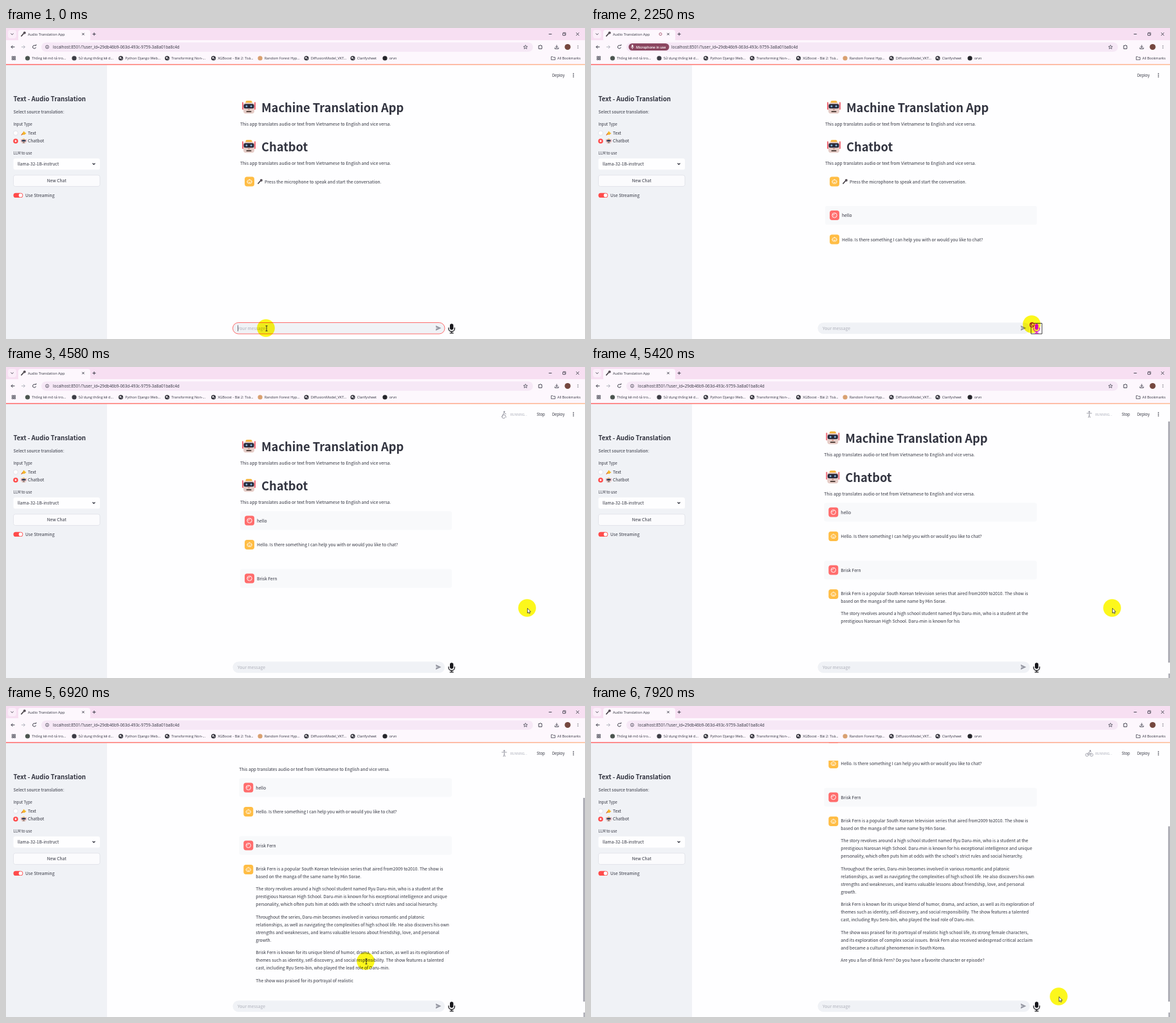
These frames come from a looping animation (900x484 px, 8000 ms). An HTML page with a canvas:

```html
<!DOCTYPE html>
<html lang="en">
<head>
<meta charset="utf-8">
<title>Audio Translation App</title>
<style>
html, body { margin: 0; width: 100%; height: 100%; overflow: hidden; background: #fefeff; }
canvas { display: block; width: 900px; height: 484px; }
</style>
</head>
<body>
<canvas id="stage"></canvas>
<script>
const LOOP = 8000;
const canvas = document.getElementById('stage');
const ctx = canvas.getContext('2d');
const ratio = window.devicePixelRatio || 1;
canvas.width = 900 * ratio;
canvas.height = 484 * ratio;

const APP = '"Noto Sans CJK SC", "Noto Sans CJK JP", "Noto Sans CJK", sans-serif';
const CHROME = '"Open Sans", "Noto Sans", sans-serif';
const BODY = 6.72, LABEL = 5.88;
const INK = '#31333f', PAGE = '#fefeff', PANEL = '#f0f2f6', BUBBLE = '#f8f9fb';
const RED = '#ff4b4b', GRAY = '#92949f', FAINT = '#aeb0ba';
const STRIP = '#f7dff2', TOOLBAR = '#fdf7fd', FIELD = '#f6e8f6';

const GREETING = 'Hello. Is there something I can help you with or would you like to chat?';
const SHOW = 'Brisk Fern';
const PARAGRAPHS = [
  [`${SHOW} is a popular South Korean television series that aired from2009 to2010. The show is`,
   'based on the manga of the same name by Min Sorae.'],
  ['The story revolves around a high school student named Ryu Daru-min, who is a student at the',
   'prestigious Narosan High School. Daru-min is known for his exceptional intelligence and unique',
   "personality, which often puts him at odds with the school's strict rules and social hierarchy."],
  ['Throughout the series, Daru-min becomes involved in various romantic and platonic',
   'relationships, as well as navigating the complexities of high school life. He also discovers his own',
   'strengths and weaknesses, and learns valuable lessons about friendship, love, and personal',
   'growth.'],
  [`${SHOW} is known for its unique blend of humor, drama, and action, as well as its exploration of`,
   'themes such as identity, self-discovery, and social responsibility. The show features a talented',
   'cast, including Ryu Sero-bin, who played the lead role of Daru-min.'],
  ['The show was praised for its portrayal of realistic high school life, its strong female characters,',
   `and its exploration of complex social issues. ${SHOW} also received widespread critical acclaim`,
   'and became a cultural phenomenon in South Korea.'],
  [`Are you a fan of ${SHOW}? Do you have a favorite character or episode?`]
];

// Flatten the answer into lines with their page position and first character.
const lines = [];
let nextY = 365, nextStart = 0;
for (const paragraph of PARAGRAPHS) {
  for (const words of paragraph) {
    lines.push({ words, y: nextY, start: nextStart });
    nextStart += words.length + 1;
    nextY += 12;
  }
  nextY += 7.5;
}
const answer = lines.map(line => line.words).join(' ');
const after = phrase => answer.indexOf(phrase) + phrase.length + 3;

const STREAM = [[4680, 0], [5420, after('known for his')], [6920, after('of realistic')], [7450, answer.length]];
const POINTER = [[0, 404, 467], [1250, 404, 467], [1850, 685, 461], [3350, 685, 461], [4000, 810, 375],
  [5950, 810, 375], [6600, 559, 397], [7100, 559, 397], [7800, 727, 452]];

const within = (t, from, to) => t >= from && t < to;
const clamp = v => Math.min(1, Math.max(0, v));
const smooth = v => v * v * (3 - 2 * v);

function track(keys, t, ease = v => v) {
  if (t <= keys[0][0]) return keys[0].slice(1);
  for (let i = 1; i < keys.length; i++) {
    const a = keys[i - 1], b = keys[i];
    if (t <= b[0]) {
      const k = ease((t - a[0]) / (b[0] - a[0]));
      return a.slice(1).map((v, j) => v + (b[j + 1] - v) * k);
    }
  }
  return keys[keys.length - 1].slice(1);
}

// Number of characters shown, cut at a whole word.
function wordCut(text, n) {
  n = Math.round(n);
  return n >= text.length ? text.length : Math.max(0, text.lastIndexOf(' ', n));
}
const streamed = t => wordCut(answer, track(STREAM, t)[0]);

function scrollAt(t) {
  const shown = streamed(t - Math.max(0, 60 + (t - 5420) / 6));
  const last = lines.filter(line => line.start < shown).pop();
  return last ? Math.max(0, last.y - 395.5) : 0;
}

// Drawing helpers; text is placed by the middle of its capitals.
function text(words, x, y, size = BODY, { color = INK, weight = 400, font = APP, align = 'left' } = {}) {
  ctx.font = `${weight} ${size}px ${font}`;
  ctx.textAlign = align;
  ctx.fillStyle = color;
  ctx.fillText(words, x, y + size * 0.367);
}
const chromeText = (words, x, y, size = 5.5) => text(words, x, y, size, { font: CHROME });

function box(x, y, w, h, fill, radius = 0, stroke) {
  ctx.beginPath();
  ctx.roundRect(x, y, w, h, radius);
  if (fill) { ctx.fillStyle = fill; ctx.fill(); }
  if (stroke) { ctx.strokeStyle = stroke; ctx.lineWidth = 0.8; ctx.stroke(); }
}
function disc(x, y, r, fill) {
  ctx.beginPath();
  ctx.arc(x, y, r, 0, 7);
  ctx.fillStyle = fill;
  ctx.fill();
}
function ring(x, y, r, color, width = 0.8, from = 0, to = Math.PI * 2) {
  ctx.beginPath();
  ctx.arc(x, y, r, from, to);
  ctx.strokeStyle = color;
  ctx.lineWidth = width;
  ctx.stroke();
}
function path(d, x, y, { stroke, fill, width = 0.9 }) {
  ctx.save();
  ctx.translate(x, y);
  const shape = new Path2D(d);
  if (fill) { ctx.fillStyle = fill; ctx.fill(shape); }
  if (stroke) { ctx.strokeStyle = stroke; ctx.lineWidth = width; ctx.stroke(shape); }
  ctx.restore();
}

function robot(x, y, scale) {
  ctx.save();
  ctx.translate(x, y);
  ctx.scale(scale, scale);
  box(-10.5, -8, 2, 12, '#ef6a78', 1);
  box(8.5, -8, 2, 12, '#ef6a78', 1);
  box(-5, -10, 10, 4, '#f5b53c', 2);
  box(-8.5, -7, 17, 17, '#e6cdc8', 4);
  box(-8, -5, 16, 7, '#28283a', 2.5);
  disc(-3.6, -1.5, 1.5, '#7fb4d8');
  disc(3.6, -1.5, 1.5, '#7fb4d8');
  box(-1.5, 3, 3, 1.5, '#c98a78', 0.7);
  box(-4, 6, 8, 1.8, '#45332d', 0.9);
  ctx.restore();
}
function micEmoji(x, y) {
  path('M-3.5 3.5L0.5-1', x, y, { stroke: '#403a40', width: 1.6 });
  disc(x + 1.8, y - 2, 2, '#585058');
}
function microphone(recording) {
  const x = 692.7, y = 467.3, color = recording ? '#d400b8' : '#18181c';
  box(x - 2.7, y - 7, 5.4, 9.5, color, 2.7);
  path('M-4.7-1V0.5A4.7 4.7 0 0 0 4.7 0.5V-1M0 5V7.5M-3 7.5H3', x, y, { stroke: color, width: 1.3 });
}

function browser(recording) {
  box(0, 0, 900, 19, STRIP);
  box(3, 3, 13, 13, '#fbeef9', 4);
  path('M-2-1L0 1L2-1', 9.5, 9.5, { stroke: INK });
  box(19, 3, 112, 18, TOOLBAR, 4);
  micEmoji(27, 9.5);
  chromeText('Audio Translation App', 34, 9.7, 5.6);
  if (recording) ring(108, 9.5, 2, '#9b4560');
  path('M-1.7-1.7L1.7 1.7M1.7-1.7L-1.7 1.7', 120, 9.5, { stroke: INK });
  path('M-2.5 0H2.5M0-2.5V2.5', 137, 9.5, { stroke: INK });
  path('M-2.3 0H2.3', 846, 9.5, { stroke: INK });
  box(865.5, 8, 3.6, 3.6, null, 0.5, INK);
  path('M-1-1.5V-2.5H3V1.5H2', 867, 9.7, { stroke: INK, width: 0.6 });
  path('M-2.2-2.2L2.2 2.2M2.2-2.2L-2.2 2.2', 888.5, 9.5, { stroke: INK });

  box(0, 19, 900, 38, TOOLBAR);
  box(55, 22.5, 764, 14.5, FIELD, 7.2);
  path('M3 0H-2.5M0-2.5L-2.5 0L0 2.5', 10.5, 29.5, { stroke: INK });
  path('M-3 0H2.5M0-2.5L2.5 0L0 2.5', 27, 29.5, { stroke: FAINT });
  ring(44, 29.5, 2.5, INK, 0.9, 0.2, 5.3);
  path('M0.8-2.3H2.8V-4', 44, 29.5, { stroke: INK });
  if (recording) {
    box(58.5, 24, 63, 11, '#8b4660', 5.5);
    box(63.3, 26, 2.2, 4, '#fff', 1);
    path('M-2-1A2 2 0 0 0 2-1M0 1V3', 64.4, 30, { stroke: '#fff', width: 0.6 });
    text('Microphone in use', 70, 29.7, 5.2, { color: '#fff', weight: 600, font: CHROME });
  } else {
    ring(64, 29.5, 2.5, INK, 0.7);
    path('M0-0.4V1.5M0-1.6V-1', 64, 29.5, { stroke: INK, width: 0.7 });
  }
  chromeText('localhost:8501/?user_id=29db46b9-063d-493c-9759-3a8a01ba8c4d', recording ? 125 : 73, 29.7, 6.33);
  path('M0-3L0.9-1L3-0.8L1.4 0.6L1.9 2.8L0 1.6L-1.9 2.8L-1.4 0.6L-3-0.8L-0.9-1Z', 807.5, 29.6, { stroke: INK, width: 0.7 });
  path('M-2.5-1.8H-0.8A0.9 0.9 0 0 1 1-1.8H2.4V0A0.9 0.9 0 0 1 2.4 1.5V3H-2.5Z', 830.5, 29.3, { stroke: INK });
  path('M0-3V1M-1.8-0.8L0 1L1.8-0.8M-2.8 1V2.8H2.8V1', 856, 29.5, { stroke: INK });
  disc(873, 29.5, 4.6, '#75473f');
  for (const dy of [-2, 0, 2]) disc(889, 29.5 + dy, 0.6, INK);

  for (let i = 0; i < 4; i++) box(9.3 + (i % 2) * 3.2, 44.2 + (i >> 1) * 3.2, 2.1, 2.1, null, 0, INK);
  const bookmarks = [
    [33.5, 'Thống kê mô tả tro...', '#4c5550'], [106, 'Sử dụng thống kê d...', '#3c3c44'],
    [178.5, 'Python Django Web...'], [250.5, 'Transforming Non-...'],
    [322.5, 'XGBoost - Bài 2: Toà...'], [395, 'Random Forest Hyp...', '#d9a070'],
    [467, 'DiffusionModel_VKT...'], [539, 'Clarifysheet'], [589, 'orvn', '#25252a']
  ];
  for (const [x, label, mark] of bookmarks) {
    disc(x, 47, 3.6, mark || '#34343c');
    if (!mark) path('M-2.5-1L0-2L1 0L-1 1ZM1 1L2.5 0L1.5 2.5Z', x, 47, { fill: '#f4eef4' });
    chromeText(label, x + 6.7, 47);
  }
  path('M-3-2.3H-0.6L0.3-1.4H3V2.4H-3Z', 850.5, 47, { stroke: INK, width: 0.7 });
  chromeText('All Bookmarks', 857, 47, 5.4);

  const decoration = ctx.createLinearGradient(0, 0, 900, 0);
  decoration.addColorStop(0, RED);
  decoration.addColorStop(1, '#ffae80');
  box(0, 56.2, 900, 1.3, decoration);
}

function sidebar() {
  box(0, 57.5, 157, 427, PANEL);
  text('Text - Audio Translation', 11.5, 110.5, 9.75, { weight: 600 });
  text('Select source translation:', 11.5, 130.7);
  text('Input Type', 11.5, 150, LABEL);
  disc(15, 163.5, 3.6, PAGE);
  ring(15, 163.5, 3.6, '#d3d5de', 0.6);
  path('M-3.5 2.5L0-3L2-1L4 0.5L1 2.7Z', 27.5, 163.5, { fill: '#f4b62c' });
  path('M-3.7 3.3L-1.5 0.5', 27.5, 163.5, { stroke: '#d7663a', width: 1.2 });
  text('Text', 34, 163.7);
  disc(15, 176, 3.8, RED);
  disc(15, 176, 1.4, '#fff');
  robot(27.5, 176, 0.38);
  text('Chatbot', 34, 176);
  text('LLM to use', 11.5, 194.5, LABEL);
  box(11.5, 203, 134.5, 17.5, PAGE, 3);
  text('llama-32-1B-instruct', 18, 211.8);
  path('M-2-1L0 1L2-1', 136.5, 211.5, { stroke: INK, width: 1.2 });
  box(11.5, 229, 134.5, 17.5, '#fbfbfd', 3, '#dfe0e8');
  text('New Chat', 78.7, 237.8, BODY, { align: 'center' });
  box(11.5, 256.7, 14.8, 7.4, RED, 3.7);
  disc(22.6, 260.4, 2.8, '#fff');
  text('Use Streaming', 30, 260.6);
}

function avatar(x, y, human) {
  box(x + 7, y - 7.5, 15, 15, human ? '#ff6c6c' : '#ffbd45', 3.7);
  const cx = x + 14.5;
  if (human) {
    ring(cx, y, 3.7, '#fff', 0.9);
    path('M-3.4-0.8Q0 0 1-3M-1.3 0.9V1.5M1.5 0.9V1.5', cx, y, { stroke: '#fff', width: 0.8 });
  } else {
    box(cx - 3.2, y - 2.5, 6.4, 5.5, null, 2, '#fff');
    path('M0-4V-2.5M-4.3 0.3H-3.2M3.2 0.3H4.3M-1.3-0.5V0.3M1.3-0.5V0.3M-1.5 1.6H1.5', cx, y, { stroke: '#fff', width: 0.8 });
  }
}
function message(x, y, words, human) {
  if (human) box(x, y - 14.5, 693 - x, 29, BUBBLE, 3);
  avatar(x, y, human);
  text(words, x + 26, y + 0.2);
}

function conversation(t, x, scroll) {
  const intro = 'This app translates audio or text from Vietnamese to English and vice versa.';
  ctx.save();
  ctx.translate(0, -scroll);
  [['Machine Translation App', 124], ['Chatbot', 185]].forEach(([title, y]) => {
    robot(x + 13.5, y - 0.7, 1);
    text(title, x + 33, y, 18.3, { weight: 700 });
    text(intro, x, y + 25.7);
  });

  const reply = GREETING.slice(0, wordCut(GREETING, GREETING.length * clamp((t - 950) / 400)));
  if (t < 4250) {
    avatar(x, 239, false);
    micEmoji(x + 31, 239);
    text('Press the microphone to speak and start the conversation.', x + 38, 239.2);
    if (t >= 640) message(x, 291.5, 'hello', true);
    if (reply) message(x, 329, reply, false);
  } else {
    message(x, 239, 'hello', true);
    message(x, 276.5, GREETING, false);
    message(x, 329, SHOW, true);
    const shown = streamed(t);
    if (shown) avatar(x, 366.5, false);
    for (const line of lines) {
      if (line.start < shown) text(line.words.slice(0, shown - line.start), x + 26, line.y + 0.2);
    }
  }
  ctx.restore();
}

function header(t) {
  box(157, 57.5, 743, 27.5, PAGE);
  text('Deploy', 849, 73.8, LABEL);
  for (const dy of [-2.5, 0, 2.5]) disc(882, 73.6 + dy, 0.8, INK);
  if (!within(t, 640, 1500) && t < 3250) return;
  const poses = [
    'M0-3.5L-2 0L1.5 1L3 4.5M-2 0L-4 4M0-2L3-1M-1.5 1A2.5 2.5 0 1 0 1.5 4',
    'M-3 2L-1-1.5L2 0L3 2M-1-1.5L1-3.5L3-2.5M-1 3L0 0',
    'M-4-2H4M0-2V1M0 1L-1.5 5M0 1L1.5 5'
  ];
  const pose = Math.floor((t + 90) / 500) % 3;
  path(poses[pose], 774.5, 74, { stroke: GRAY });
  disc(774.5 + (pose === 1 ? 1.5 : 0), 69.7, 1.2, GRAY);
  if (pose === 1) {
    ring(771, 76, 2.3, GRAY);
    ring(778, 76, 2.3, GRAY);
  }
  text('RUNNING...', 784, 73.8, 4.9, { color: FAINT });
  text('Stop', 825, 73.8, LABEL);
}

function inputBar(t, recording) {
  box(157, 446, 740, 38, PAGE);
  const focused = t < 640;
  box(352.5, 458.5, 329.5, 17.5, PANEL, 8.7, focused ? RED : null);
  const typed = focused ? 'hello'.slice(0, Math.floor(5 * clamp((t - 150) / 380))) : '';
  text(typed || 'Your message', 360, 467.3, BODY, { color: typed ? INK : FAINT });
  if (focused) {
    const caret = 360 + (typed ? ctx.measureText(typed).width : 0);
    box(caret, 462.5, 0.7, 9.5, INK);
  }
  path('M-4-4L4.5 0L-4 4L-3.5 0.8L0.5 0L-3.5-0.8Z', 672, 467, { fill: GRAY });
  if (recording) box(684, 459.5, 17, 16.5, PAGE, 0, '#111');
}

function halo([x, y]) {
  ctx.globalCompositeOperation = 'multiply';
  disc(x, y, 13.8, '#fdf81c');
  ctx.globalCompositeOperation = 'source-over';
}
function cursor([x, y], t, recording) {
  if (recording) {
    ring(x + 0.5, y + 1, 3.3, '#b01020', 1.2);
    path('M-2.3-2.3L2.3 2.3', x + 0.5, y + 1, { stroke: '#b01020', width: 1.2 });
  } else if (t < 1300 || within(t, 6500, 7150)) {
    path('M-1.5-4H1.5M0-4V4M-1.5 4H1.5', x + 1, y + 0.5, { stroke: '#222', width: 0.9 });
  } else {
    path('M0 0V7.5L1.7 6L2.8 8.4L4 7.8L2.9 5.5H5.2Z', x + 0.5, y + 0.5, { fill: '#fff', stroke: '#222', width: 0.7 });
  }
}

function draw(t) {
  const recording = within(t, 2050, 3170);
  const overflowing = t >= 4950;
  const scroll = overflowing ? scrollAt(t) : 0;
  const position = track(POINTER, t, smooth);
  ctx.setTransform(ratio, 0, 0, ratio, 0, 0);
  box(0, 0, 900, 484, PAGE);
  conversation(t, overflowing ? 362.3 : 364, scroll);
  header(t);
  inputBar(t, recording);
  if (overflowing) {
    const top = 77 + scroll * 0.59;
    box(897, top, 3, 460 - top, '#b0b0b8');
    box(897.5, 477, 2.5, 7, '#b0b0b8');
  }
  sidebar();
  browser(recording);
  halo(position);
  microphone(recording);
  cursor(position, t, recording);
}

function frame() {
  draw(performance.now() % LOOP);
  requestAnimationFrame(frame);
}
frame();
</script>
</body>
</html>
```
